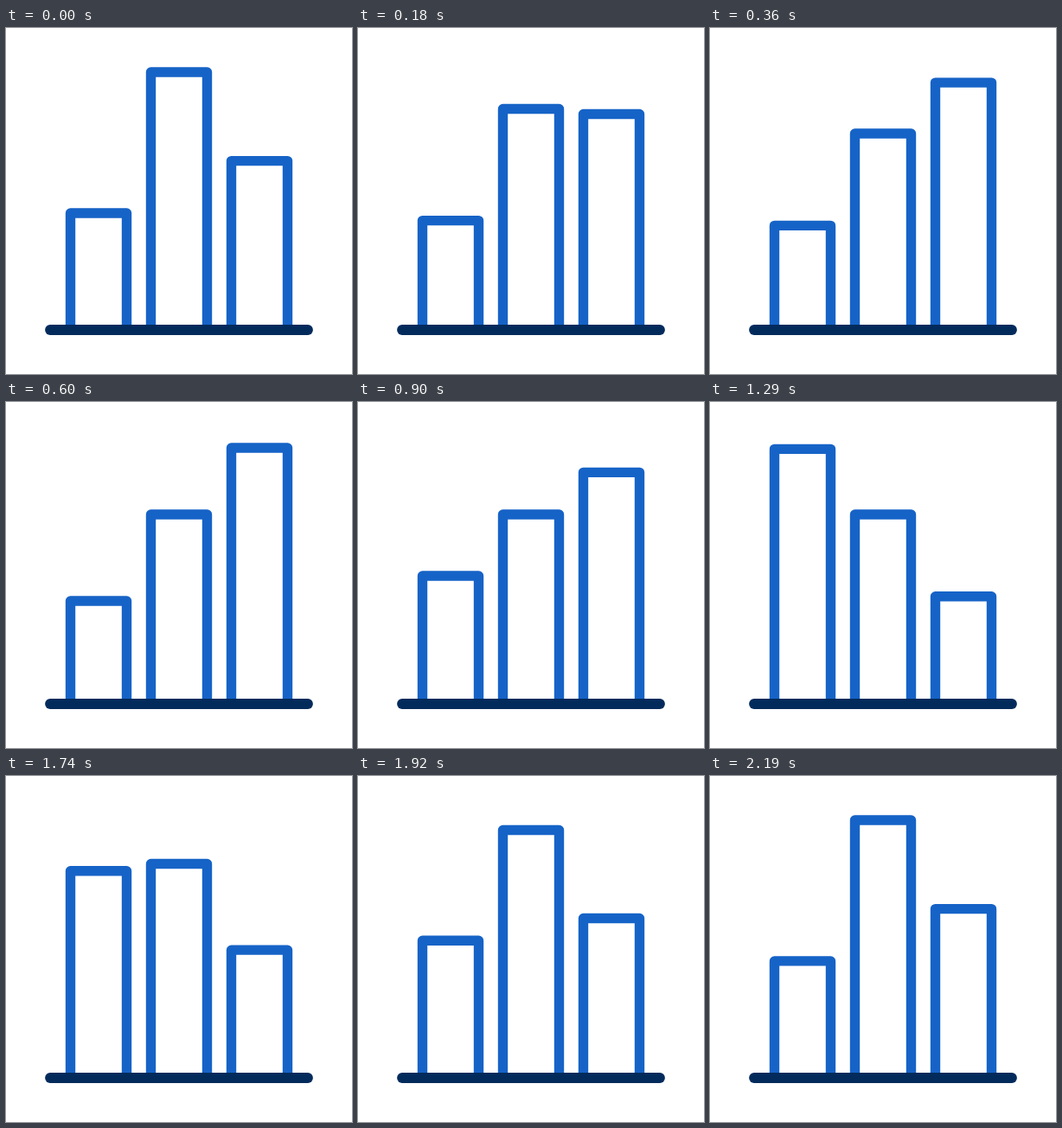
An HTML page with a canvas that plays this animation: 400 px wide and 400 px high, repeating every 2.43 s.

```html
<!DOCTYPE html>
<html lang="en">
<head>
<meta charset="utf-8">
<title>Bar chart</title>
<style>
  html, body { margin: 0; width: 100%; height: 100%; overflow: hidden; background: #fff; }
  canvas { display: block; }
</style>
</head>
<body>
<canvas id="stage" width="400" height="400"></canvas>
<script>
const ctx = document.getElementById('stage').getContext('2d');

const LOOP = 2430, TICK = 30, PERIOD = 800, FIRST_MOVE = 10, MOVE = 600;
const BASE_Y = 349;

// Each bar: left and right stroke centres, and its top in the three poses.
const bars = [
  { left: 74.5, right: 139.5, tops: [214, 230, 51] },
  { left: 167.5, right: 232.5, tops: [51, 130, 130] },
  { left: 260.5, right: 325.5, tops: [153.6, 53, 228] }
];

const bezier = (a, b, t) => 3 * a * t * (1 - t) ** 2 + 3 * b * t * t * (1 - t) + t ** 3;

// Cubic bezier easing (.28, 0, .1, 1), solved by bisection.
function ease(x) {
  if (x <= 0) return 0;
  if (x >= 1) return 1;
  let low = 0, high = 1;
  for (let i = 0; i < 30; i++) {
    const mid = (low + high) / 2;
    if (bezier(0.28, 0.1, mid) < x) low = mid;
    else high = mid;
  }
  return bezier(0, 1, low);
}

function line(points, color, width) {
  ctx.beginPath();
  points.forEach(([x, y]) => ctx.lineTo(x, y));
  ctx.strokeStyle = color;
  ctx.lineWidth = width;
  ctx.stroke();
}

function draw(time) {
  const t = Math.max(0, time - FIRST_MOVE);
  const pose = Math.min(2, Math.floor(t / PERIOD));
  const progress = ease((t - pose * PERIOD) / MOVE);

  ctx.fillStyle = '#fff';
  ctx.fillRect(0, 0, 400, 400);
  ctx.lineJoin = ctx.lineCap = 'round';

  for (const { left, right, tops } of bars) {
    const from = tops[pose], to = tops[(pose + 1) % 3];
    const top = from + (to - from) * progress;
    line([[left, BASE_Y], [left, top], [right, top], [right, BASE_Y]], '#1663c7', 11.4);
  }
  line([[51, BASE_Y], [349, BASE_Y]], '#022b5c', 11.8);
}

const start = performance.now();
function frame() {
  const time = (performance.now() - start) % LOOP;
  draw(Math.floor(time / TICK) * TICK);
  requestAnimationFrame(frame);
}
frame();
</script>
</body>
</html>
```
